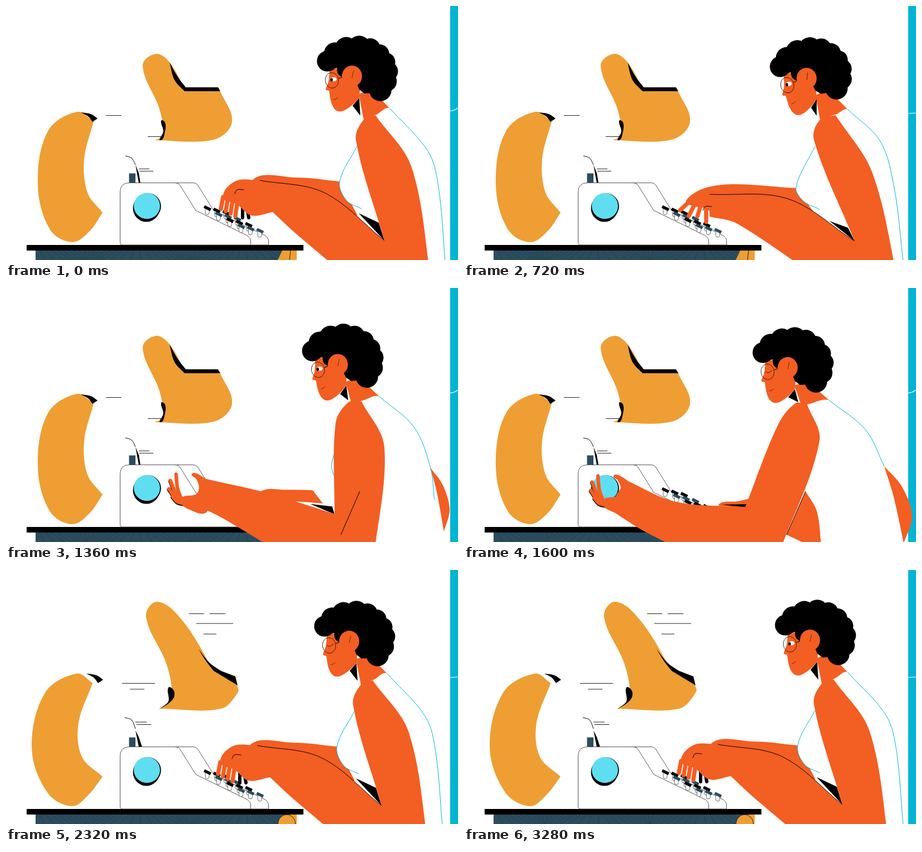
An HTML page with a canvas that plays this animation: 810x456 px, repeating every 3360 ms.

```html
<!DOCTYPE html>
<html lang="en">
<head>
<meta charset="utf-8">
<title>Typist</title>
<style>
html, body { margin: 0; width: 100%; height: 100%; overflow: hidden; background: #fff; }
canvas { display: block; width: 810px; height: 456px; }
</style>
</head>
<body>
<canvas id="stage" width="810" height="456"></canvas>
<script>
const ctx = document.getElementById('stage').getContext('2d');
const LOOP = 3360, RAD = Math.PI / 180;
const SKIN = '#f35e22', GOLD = '#ee9e33', TEAL = '#2b4d5e', CYAN = '#5fdef2', BLUE = '#00b5d4', INK = '#000';
const KNOB = [253, 360];

// "x,y" points separated by spaces; a trailing ! marks a sharp corner
const parse = s => s.split(' ').map(w => {
  const [x, y] = w.replace('!', '').split(',').map(Number);
  return [x, y, w.endsWith('!') ? 1 : 0];
});
const parseAll = o => Object.fromEntries(Object.entries(o).map(([k, v]) => [k, parse(v)]));
const mix = (a, b, k) => [a[0] + (b[0] - a[0]) * k, a[1] + (b[1] - a[1]) * k, a[2] | b[2]];
const mixPts = (a, b, k) => a.map((p, i) => mix(p, b[i], k));
const mixAll = (a, b, k) => Object.fromEntries(Object.keys(a).map(n => [n, mixPts(a[n], b[n], k)]));
const move = (p, x, y) => [p[0] + x, p[1] + y, p[2]];
const shift = (pose, x, y) => Object.fromEntries(Object.entries(pose).map(([n, pts]) =>
  [n, n === 'tilt' ? pts : pts.map(p => move(p, x, y))]));
const clamp = x => Math.max(0, Math.min(1, x));
const ease = x => { x = clamp(x); return x * x * (3 - 2 * x); };
const bump = (t, a, b) => t > a && t < b ? Math.sin(Math.PI * (t - a) / (b - a)) ** 2 : 0;

function handle(p, from, to, len, sign) {
  const dx = to[0] - from[0], dy = to[1] - from[1], d = Math.hypot(dx, dy) || 1;
  return [p[0] + sign * dx / d * len / 3, p[1] + sign * dy / d * len / 3];
}
function trace(pts, closed) {
  const n = pts.length;
  const at = i => closed ? pts[(i + n) % n] : pts[Math.max(0, Math.min(n - 1, i))];
  ctx.beginPath();
  ctx.moveTo(pts[0][0], pts[0][1]);
  for (let i = 0; i < (closed ? n : n - 1); i++) {
    const p = at(i), q = at(i + 1), len = Math.hypot(q[0] - p[0], q[1] - p[1]);
    const c = handle(p, p[2] ? p : at(i - 1), q, len, 1);
    const d = handle(q, p, q[2] ? q : at(i + 2), len, -1);
    ctx.bezierCurveTo(c[0], c[1], d[0], d[1], q[0], q[1]);
  }
}
function fill(pts, color) { trace(pts, true); ctx.fillStyle = color; ctx.fill(); }
function facet(pts, color) { fill(pts.map(p => [p[0], p[1], 1]), color); }
function stroke(pts, color = INK, width = 1) {
  trace(pts, false);
  ctx.strokeStyle = color; ctx.lineWidth = width; ctx.stroke();
}
function oval(x, y, rx, ry, color) {
  ctx.beginPath(); ctx.ellipse(x, y, rx, ry, 0, 0, Math.PI * 2);
  ctx.fillStyle = color; ctx.fill();
}
function rect(x, y, w, h, color) { ctx.fillStyle = color; ctx.fillRect(x, y, w, h); }
const rule = (x, y, w) => rect(x, y, w, 1, '#222');

// Key points of the body; tilt holds the head angle and how far the rear elbow shows
const typing = parseAll({
  near: '641,204 627,240 678,421! 570,335 455,313! 478,370! 520,409 640,510! 764,510! 727,290 662,196!',
  far: '440,315 520,308 598,315! 630,376! 480,360',
  shade: '632,372 668,389 678,421',
  back: '664,195! 688,184 757,262 775,325 787,458!',
  front: '641,204! 629,252 598,315 610,349 637,364 740,458!',
  palm: '412,314 389,343 414,356 440,376',
  tips: '385,364 411,377',
  head: '0,0',
  tilt: '0,0'
});
const lean = parseAll({
  near: '638,204 627,240 700,422! 580,346 440,338! 440,378! 490,391 665,510! 781,510! 732,300 666,196!',
  far: '392,350 450,320 595,325! 631,376! 420,362',
  shade: '655,386 688,398 700,422',
  back: '668,194! 688,186 746,243 771,327 787,458!',
  front: '638,204! 629,252 595,325 608,350 637,365 740,458!',
  palm: '428,345 402,350 432,362 442,375',
  tips: '385,374 434,388',
  head: '-6,4',
  tilt: '-7.5,0'
});
const point = { ...lean, ...parseAll({
  far: '455,336 520,335 599,343! 631,376! 480,360',
  palm: '448,336 428,354 450,366 462,386',
  tips: '406,357 434,390',
  tilt: '-7.5,.6'
}) };
const reach = parseAll({
  near: '594,207 563,245 504,393! 380,384 290,345! 258,395! 318,434 400,475! 565,475! 637,275 615,209!',
  far: '457,388 490,383 512,378! 520,395! 480,392',
  shade: '462,389 506,388 504,394',
  back: '615,209! 655,202 720,255 753,320 753,320!',
  front: '605,212! 590,250 575,310 585,345 612,362 780,458!',
  palm: '270,345 250,350 262,380 262,392',
  tips: '235,345 240,380',
  head: '-40,17',
  tilt: '0,1'
});
const turned = shift(reach, -5, 0), returned = shift(typing, -5, 2);
const keys = [[0, typing], [80, typing], [320, lean], [640, lean], [1040, point], [1120, point], [1560, reach],
  [1600, reach], [1960, turned], [2040, turned], [2320, returned], [2560, typing], [LOOP, typing]];

const lettersLow = parseAll({
  top: '268,86 245,108 275,185 281,232 267,241! 372,240 405,208 384,153! 322,152! 293,101',
  shade: '293,101! 307,126 322,146! 380,146! 384,153! 320,153! 302,133',
  curl: '278,206 285,209 285,225 277,241 282,225'
});
const lettersHigh = parseAll({
  top: '272,57 251,84 288,170 296,230 275,249! 385,249 416,219 414,206! 372,180 318,93',
  shade: '345,142! 364,166 385,181 411,191! 415,207! 372,181! 358,163',
  curl: '291,211 301,217 299,232 276,249 291,236'
});
const crescent = parse('127,190 75,225 57,320 78,400 118,424 150,404 173,371! 146,335 140,275 157,207!');
const crescentShade = parse('134,191! 152,194 164,202! 155,208! 147,198');

function drawLetters(t) {
  const k = 1 - Math.pow(1 - clamp((t - 1640) / 480), 2.4);
  const s = mixAll(lettersLow, lettersHigh, k);
  // the crescent bulges to the left while its top right end stays put
  fill(crescent.map(p => {
    const bulge = Math.sin(Math.PI * (p[1] - 187) / 237) * clamp((172 - p[0]) / 25);
    return move(p, -11 * k * bulge, p[1] < 230 ? -4 * k : 0);
  }), GOLD);
  fill(crescentShade.map(p => move(p, 10 * k, -5 * k)), INK);
  fill(s.top, GOLD);
  fill(s.shade, INK);
  fill(s.curl, INK);
  stroke([[214 - k, 269 - 4 * k], [225, 273 - 4 * k], [232, 285]]);
  facet([[232, 285 + 3 * k], [238, 300], [241 + 3 * k, 318], [238, 318]], INK);
  if (t < 1720) {
    rule(179, 196, 28); rule(254, 234, 25); rule(238, 292, 19); rule(239, 296, 25);
  } else {
    rule(208, 203, 59); rule(222, 213.5, 26); rule(232, 272.5, 20); rule(234, 277, 26);
    rule(328, 78, 27); rule(365, 78, 28); rule(341, 95.5, 66); rule(354, 114.5, 23);
  }
}

function drawDesk(t) {
  rect(53, 439, 468, 17, TEAL);
  ctx.save();
  ctx.beginPath(); ctx.rect(53, 439, 468, 17); ctx.clip();
  for (let i = 0; i < 44; i++) {
    const x = 50 + i * 10, a = Math.sin(i * 12.9) * 30;
    stroke([[x, 438], [x + a, 457]], 'rgba(0,0,0,.28)', 0.7);
  }
  const dome = t >= 160 && t < 700 || t > 2140;
  facet([[dome ? 500 : 495, 439], [521, 439], [521, 456], [487, 456]], GOLD);
  if (dome) {
    oval(503, 456, 15.5, 17, GOLD);
    ctx.strokeStyle = '#222'; ctx.lineWidth = 1; ctx.stroke();
  } else stroke([[510, 439], [508, 456]], '#222');
  ctx.restore();
  rect(37, 429, 496, 10, INK);
}

function drawKey(x, y, color) {
  ctx.beginPath();
  ctx.moveTo(x - 4, y + 1);
  ctx.arc(x - 0.5, y + 8, 3.5, Math.PI, 0, true);
  ctx.lineTo(x + 3, y + 3);
  ctx.strokeStyle = '#444'; ctx.lineWidth = 0.8; ctx.fillStyle = '#fff';
  ctx.fill(); ctx.stroke();
  ctx.save();
  ctx.translate(x, y); ctx.rotate(0.45);
  rect(-6.5, -2.6, 13, 5.2, color);
  ctx.restore();
}

// Rounded side of the machine: up to the slope, down it, and to the desk
function casing(left, top, knee, front) {
  ctx.beginPath();
  ctx.moveTo(left, 317.5);
  ctx.lineTo(top, 317.5);
  ctx.quadraticCurveTo(top + 5, 317.5, top + 8, 322);
  ctx.lineTo(knee, 367);
  ctx.lineTo(front - 8.5, 411);
  ctx.quadraticCurveTo(front, 415, front, 422);
  ctx.lineTo(front, 429);
}

function drawMachine() {
  rect(220.5, 300.5, 11.5, 17, TEAL);
  ctx.fillStyle = '#fff'; ctx.strokeStyle = '#4a4042'; ctx.lineWidth = 0.9;
  casing(221, 336, 372, 470.5);
  ctx.lineTo(209, 429);
  ctx.quadraticCurveTo(204.5, 429, 204.5, 424);
  ctx.lineTo(204.5, 334);
  ctx.quadraticCurveTo(204.5, 317.5, 221, 317.5);
  ctx.fill(); ctx.stroke();
  casing(300, 304, 340, 438.5);
  ctx.stroke();
  oval(251.5, 363, 24, 24.5, INK);
  oval(254, 359.5, 23.8, 23.5, INK);
  oval(252.5, 359, 23.5, 23.3, CYAN);
  for (let row = 0; row < 4; row++)
    for (let i = 0; i < 3; i++)
      drawKey(361 + row * 20.2 + i * 16.8, 363 + row * 10.8 + i * 4.1, row % 2 ? TEAL : INK);
}

const face = parse('580,114! 578,135 573,149 574,151 579,152! 583,174 591,187 602,189 619,179 633,165! 636,130! 610,110!');
const fringe = parse('563,110! 576,116 593,111! 595,122 604,129! 625,130! 633,150! 642,157! 675,155! 685,95! 630,70! 580,85!');

function drawHair() {
  fill(fringe, INK);
  for (let i = 0; i < 10; i++) {
    const a = (205 + i * 22) * RAD, c = Math.cos(a), s = Math.sin(a);
    const r = 18.6 + 1.8 * Math.sin(i * 0.8);
    oval(632 + c * (c < 0 ? 62 : 53), 118 + s * (s < 0 ? 45 : 48), r, r, INK);
  }
}

function drawHead(dx, dy, tilt, shut) {
  ctx.save();
  ctx.translate(620 + dx, 126 + dy);
  ctx.rotate(tilt * RAD);
  ctx.translate(-620, -126);
  fill(face, SKIN);
  drawHair();
  oval(620, 126, 18, 19, SKIN);
  stroke(parse('623,116 620,129'), '#5a2410', 0.9);
  if (shut) stroke(parse('580,133 585,135 592,131'), '#3a1608');
  else {
    oval(587, 131.5, 5.5, 3.8, '#fff');
    oval(583.5, 132.5, 2.3, 3, INK);
  }
  ctx.beginPath(); ctx.ellipse(584, 133.5, 11.8, 14, -0.15, 0, Math.PI * 2);
  ctx.strokeStyle = '#3a1608'; ctx.lineWidth = 0.9; ctx.stroke();
  stroke(parse('596,130 602,128'));
  stroke(parse('587,168 591,167 595,164'), '#6a260c', 0.9);
  ctx.restore();
}

function drawTypingHand(p, t) {
  const [top, first, last, under] = p.palm;
  const amp = 6 * (bump(t, 320, 1040) + bump(t, 2560, 3280));
  const lift = i => amp * Math.abs(Math.sin(t / 95 + i * 1.7));
  if (p.tilt[0][0] > -4)
    for (let i = 0; i < 2; i++)
      stroke([move(last, 10 + 8 * i, 6), move(last, 10 + 11 * i, 24 - lift(i))], INK, 6);
  for (let i = 0; i < 4; i++)
    stroke([mix(first, last, i / 3), move(mix(...p.tips, i / 3), 0, -lift(i))], SKIN, 7.5);
  fill([p.near[4], top, first, last, under, p.near[5], move(p.near[5], 12, -20)], SKIN);
  stroke([move(top, -2, 23), move(top, 2, 16), move(top, 14, 16)]);
}

const grip = parse('300,356 281,338 268,337 276,346 281,360 276,373 252,378 248,388 262,400 295,405');

// Fingers fan out around the knob and roll with it
function drawGrip(wrist, turn) {
  const [kx, ky] = KNOB;
  ctx.save();
  ctx.translate(wrist[0] - 290 + kx, wrist[1] - 345 + ky);
  ctx.rotate(-25 * RAD * turn);
  ctx.translate(-kx, -ky);
  for (let i = 0; i < 4; i++) {
    const a = (240 - 34 * i) * RAD;
    const tip = [kx + 26 * Math.cos(a), ky + 26 * Math.sin(a)], base = [kx - 4 + 2 * i, ky + 21 + 3 * i];
    const knuckle = move(mix(tip, base, 0.5), -2, 3);
    if (i) stroke([move(base, 0, 1.5), move(knuckle, 0, 1.5), move(tip, 0, 1.5)], INK, 7);
    stroke([base, knuckle, tip], SKIN, 6.5);
  }
  fill(grip, SKIN);
  ctx.restore();
}

function drawWoman(t) {
  let i = 0;
  while (i < keys.length - 2 && t >= keys[i + 1][0]) i++;
  const [t0, a] = keys[i], [t1, b] = keys[i + 1];
  const p = mixAll(a, b, ease((t - t0) / (t1 - t0)));
  const reaching = t >= 1320 && t < 2180;
  const turn = ease((t - 1600) / 360) * (1 - ease((t - 2040) / 280));
  const [dx, dy] = p.head[0], [tilt, elbow] = p.tilt[0];
  const onHead = (x, y) => {
    const c = Math.cos(tilt * RAD), s = Math.sin(tilt * RAD);
    x -= 620; y -= 126;
    return [620 + dx + x * c - y * s, 126 + dy + x * s + y * c];
  };
  const wrist = p.near[4];
  // the forearm rises as the knob is turned
  const near = p.near.map((q, n) => n > 2 && n < 6 ? move(q, 16 * turn, -9 * turn) : q);

  fill(p.far, SKIN);
  facet([onHead(632, 158), p.front[0], p.back[0], p.back[1], onHead(655, 150)], SKIN);
  facet([onHead(621, 179), onHead(633, 165), move(p.front[0], -6, -7)], INK);
  fill([...p.front, ...p.back.slice().reverse()], '#fff');
  stroke(p.front.slice(1, 5), BLUE);
  stroke(p.back.slice(1), BLUE);

  const corner = p.back[3];
  fill(parse('0,0! 32,37 50,90 35,138! 17,55').map(q =>
    [corner[0] + q[0] * elbow * elbow, corner[1] + q[1] * elbow, q[2]]), SKIN);
  const waist = parse('612,365! 632,400 640,458! 610,458! 578,443!').map(q => move(q, near[10][0] - 615, 0));
  if (reaching) fill(waist, SKIN);
  facet(p.shade, INK);
  fill(near, SKIN);
  stroke(reaching ? [waist[0], waist[4]] : [near[2], near[3], near[4]]);

  ctx.lineCap = 'round';
  if (reaching) drawGrip(wrist, turn);
  else drawTypingHand(p, t);
  ctx.lineCap = 'butt';
  drawHead(dx, dy, tilt, t >= 1480 && t < 1680 || t >= 2200 && t < 2400);
}

function draw(time) {
  const raw = time % LOOP;
  const step = raw >= 1600 && raw < 2000 ? 40 : 80;
  const t = Math.floor(raw / step) * step;
  rect(0, 0, 810, 456, '#fff');
  drawLetters(t);
  rect(796, 0, 14, 456, BLUE);
  const flat = t >= 680 && t < 1320 || t >= 2140;
  stroke(flat ? [[796, 193], [810, 192]] : [[796, 188.5], [803, 187], [810, 183]], '#fff', 1.2);
  drawDesk(t);
  drawMachine();
  drawWoman(t);
}

const start = performance.now();
function tick() {
  draw(performance.now() - start);
  requestAnimationFrame(tick);
}
tick();
</script>
</body>
</html>
```
